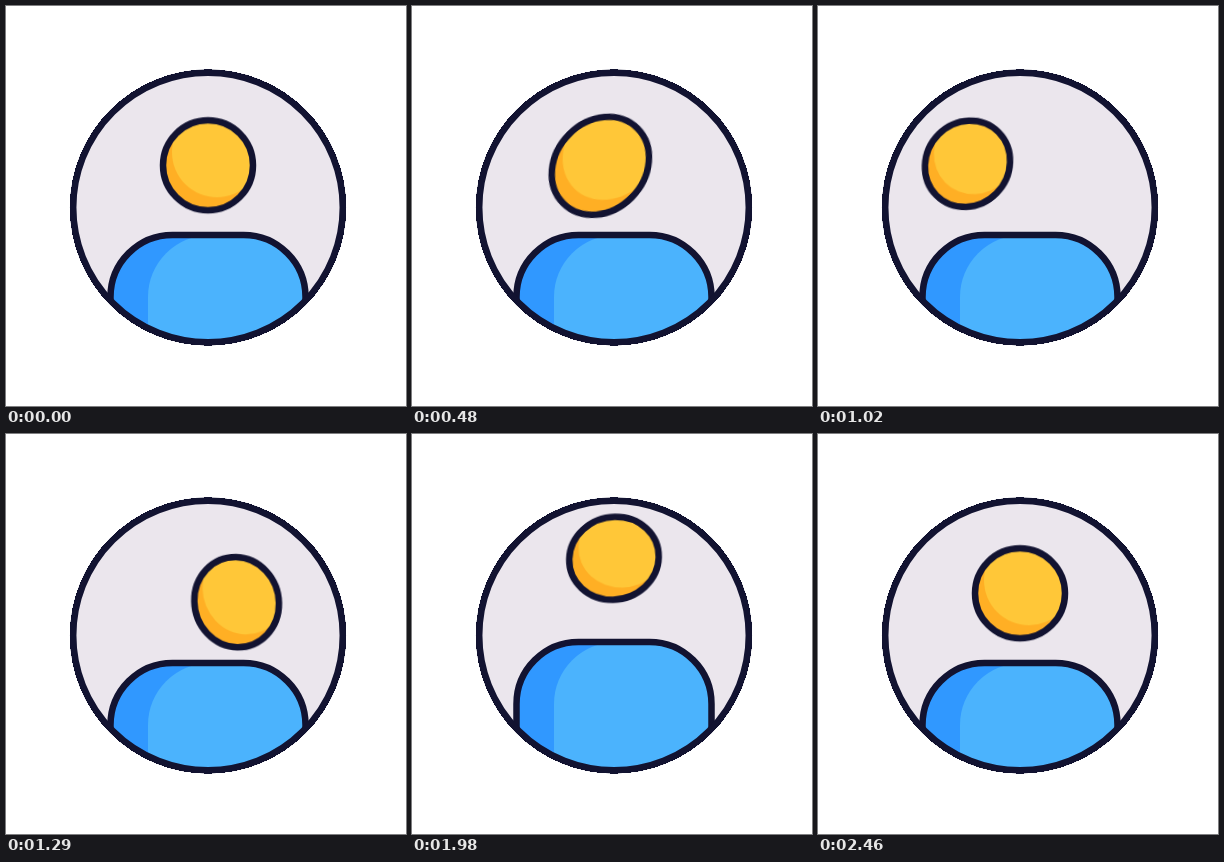
An HTML page that plays this animation: 400 by 400 pixels, repeating every 2520 ms.

```html
<!DOCTYPE html>
<html lang="en">
<head>
<meta charset="utf-8">
<title>Avatar</title>
<style>
  html, body { margin: 0; width: 100%; height: 100%; overflow: hidden; background: #fff; }
  svg { display: block; width: 100vw; height: 100vh; }
  .line { fill: none; stroke: #121331; stroke-width: 6.5; vector-effect: non-scaling-stroke; }
  .move, .flex, .body { animation: 2520ms linear infinite; }
  .move { animation-name: move; }
  .flex { animation-name: flex; }
  .body { animation-name: jump; }

  /* wind up, swing left, swing right, hop back to the middle */
  @keyframes move {
    0% { transform: translate(0, 0); animation-timing-function: ease-in-out; }
    10.71% { transform: translate(11px, -2px); animation-timing-function: ease-in; }
    19.05% { transform: translate(-13.5px, .5px); }
    23.81% { transform: translate(-29px, 8px); animation-timing-function: ease-out; }
    28.57%, 36.31% { transform: translate(-38px, 0); animation-timing-function: ease-in-out; }
    40.48% { transform: translate(-52.5px, -1.5px); animation-timing-function: ease-in; }
    46.43% { transform: translate(-5px, 3px); }
    51.19% { transform: translate(28.5px, 9px); animation-timing-function: ease-out; }
    55.95%, 61.31% { transform: translate(38px, .5px); animation-timing-function: ease-in-out; }
    66.07% { transform: translate(46px, 2px); animation-timing-function: ease-in; }
    70.24% { transform: translate(38px, .5px); }
    74.4% { transform: translate(18px, -24px); animation-timing-function: ease-out; }
    78.57% { transform: translate(0, -35px); animation-timing-function: ease-in; }
    85.12% { transform: translate(0, 4px); animation-timing-function: ease-in-out; }
    91% { transform: translate(0, -2px); animation-timing-function: ease-in-out; }
    97.62%, 100% { transform: translate(0, 0); }
  }

  /* squash and stretch along a turning axis */
  @keyframes flex {
    0% { transform: rotate(-46deg) scale(1, 1) rotate(46deg); }
    10.71% { transform: rotate(-46deg) scale(.985, .93) rotate(46deg); }
    19.05% { transform: rotate(-46deg) scale(1.173, .989) rotate(46deg); }
    23.81% { transform: rotate(-75deg) scale(1.007, .93) rotate(75deg); }
    28.57%, 36.31% { transform: rotate(-50deg) scale(1, 1) rotate(50deg); }
    40.48% { transform: rotate(-50deg) scale(.985, .917) rotate(50deg); }
    46.43% { transform: rotate(-135deg) scale(1.15, .98) rotate(135deg); }
    51.19% { transform: rotate(-105deg) scale(1.007, .935) rotate(105deg); }
    55.95%, 61.31% { transform: rotate(-130deg) scale(1, 1) rotate(130deg); }
    66.07% { transform: rotate(-130deg) scale(.985, .93) rotate(130deg); }
    70.24% { transform: rotate(-135deg) scale(1, 1) rotate(135deg); }
    74.4% { transform: rotate(-135deg) scale(1.1, .98) rotate(135deg); }
    78.57% { transform: rotate(-195deg) scale(1, .915) rotate(195deg); }
    85.12% { transform: rotate(-180deg) scale(1.03, .95) rotate(180deg); }
    91%, 100% { transform: rotate(-180deg) scale(1, 1) rotate(180deg); }
  }

  @keyframes jump {
    0%, 61.31% { transform: translateY(0); animation-timing-function: ease-in-out; }
    66.07% { transform: translateY(4px); animation-timing-function: ease-in; }
    70.24% { transform: translateY(0); animation-timing-function: ease-out; }
    78.57% { transform: translateY(-21px); animation-timing-function: ease-in; }
    85.12% { transform: translateY(3px); animation-timing-function: ease-in-out; }
    91%, 100% { transform: translateY(0); }
  }
</style>
</head>
<body>
<svg viewBox="0 0 400 400">
  <defs>
    <clipPath id="disc"><circle cx="202" cy="201.5" r="135"/></clipPath>
    <clipPath id="face"><circle r="45"/></clipPath>
    <clipPath id="torso"><path id="shape" d="M104.500 400V291A62 62 0 0 1 166.500 229H237.500A62 62 0 0 1 299.500 291V400Z"/></clipPath>
  </defs>
  <circle cx="202" cy="201.5" r="138.200" fill="#121331" shape-rendering="crispEdges"/>
  <circle cx="202" cy="201.5" r="134" fill="#ebe6ed"/>
  <g clip-path="url(#disc)">
    <g class="body">
      <use href="#shape" fill="#3098ff"/>
      <path d="M142 400V291A62 62 0 0 1 204 229H310V400Z" fill="#4bb3fd" clip-path="url(#torso)"/>
      <use href="#shape" class="line"/>
    </g>
  </g>
  <g transform="translate(202 159.300)">
    <g class="move">
      <g class="flex">
        <circle r="45" fill="#ffaf24"/>
        <circle cx="9" cy="-13" r="45" fill="#ffc738" clip-path="url(#face)" style="clip-path: none" visibility="hidden"/>
        <g clip-path="url(#face)"><circle cx="9" cy="-13" r="45" fill="#ffc738"/></g>
        <circle class="line" r="45"/>
      </g>
    </g>
  </g>
  <circle class="line" cx="202" cy="201.5" r="134.800"/>
</svg>
</body>
</html>
```
